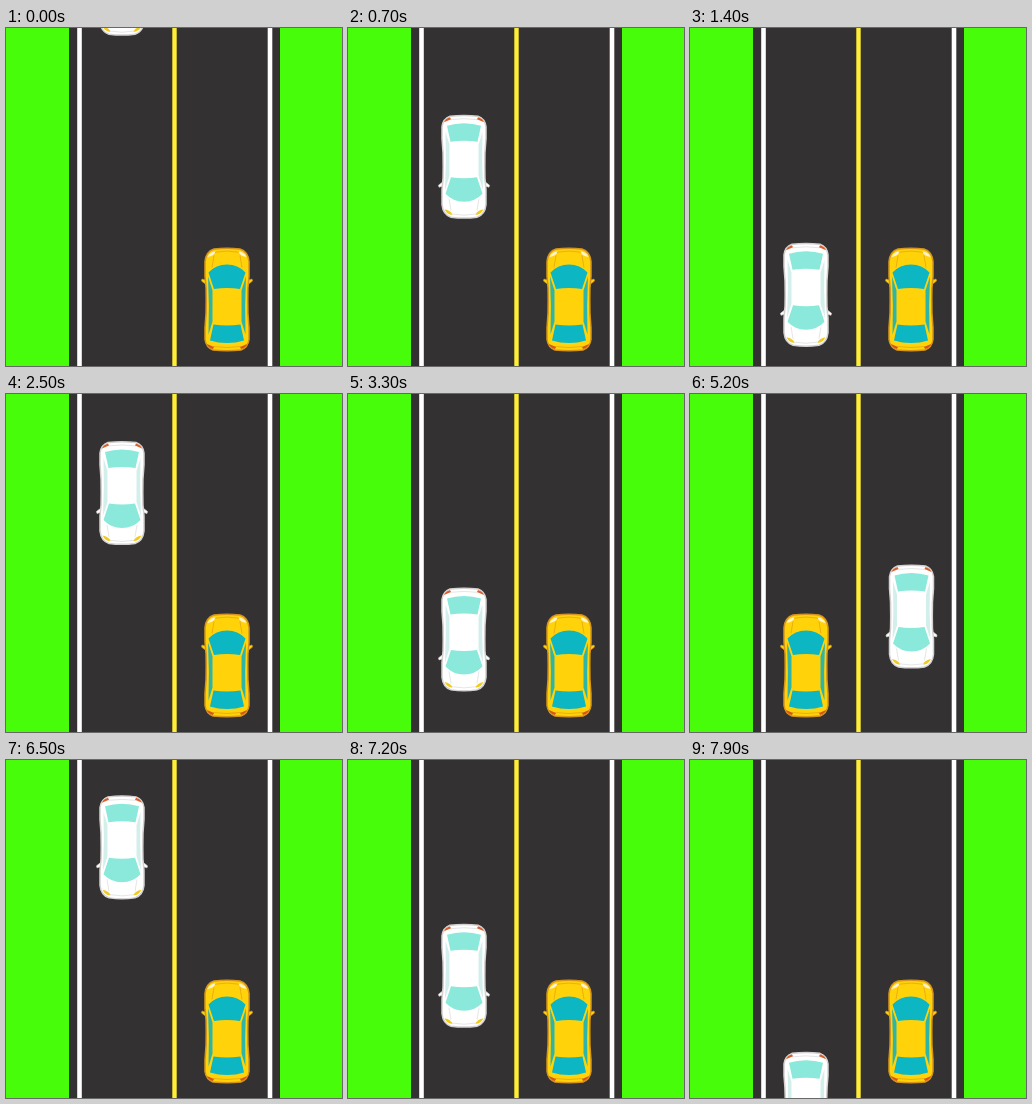
An HTML page that plays this animation: 336x338 px, repeating every 8000 ms.

```html
<!DOCTYPE html>
<html>
<head>
<meta charset="utf-8">
<style>
  html, body { margin: 0; height: 100%; overflow: hidden; }
  svg { display: block; width: 100vw; height: 100vh; }
  #player { --body: #ffd20a; --edge: #d5951c; --glass: #0cb6c2; --side: #2fb5a8; --lamp: #fff3d2; --brake: #d9541e; --crease: #e9b010; }
  #rival { --body: #fff; --edge: #d3d0cf; --glass: #8ae9da; --side: #d3efeb; --lamp: #f0cb1c; --brake: #d9602c; --crease: #e6e6e6; }
</style>
</head>
<body>
<svg viewBox="0 0 336 338" preserveAspectRatio="none">
  <defs>
    <!-- car seen from above, nose at y = 0, tail at y = 104 -->
    <g id="car">
      <path d="M-21 37L-25.5 33.5L-25 31.5L-20 33ZM21 37L25.5 33.5L25 31.5L20 33Z" fill="var(--body)" stroke="var(--edge)" stroke-width=".7"/>
      <path d="M-13 1.5Q0 -.2 13 1.5Q21 4 22 14V29Q20.5 40 20.8 52Q20.5 66 22 80V92Q21 100 14 102.5Q0 104 -14 102.5Q-21 100 -22 92V80Q-20.5 66 -20.8 52Q-20.5 40 -22 29V14Q-21 4 -13 1.5Z" fill="var(--body)" stroke="var(--edge)" stroke-width="1.5"/>
      <path d="M-15 5Q0 2 15 5M-13 8L-15 20M13 8L15 20M-14 99Q0 101 14 99" fill="none" stroke="var(--crease)"/>
      <path d="M-19 29L-14.5 43V74L-18.5 87Q-17.5 58 -19 29ZM19 29L14.5 43V74L18.5 87Q17.5 58 19 29Z" fill="var(--side)"/>
      <path d="M-18.5 25Q-11 17 0 17Q11 17 18.5 25L13 41.5Q0 39.5 -13 41.5Z" fill="var(--glass)"/>
      <path d="M-13.5 77Q0 79 13.5 77L17 93Q9 95.5 0 95.5Q-9 95.5 -17 93Z" fill="var(--glass)"/>
      <path d="M-19.5 9.5Q-17 4 -11.5 4Q-13 8.5 -19.5 9.5ZM19.5 9.5Q17 4 11.5 4Q13 8.5 19.5 9.5Z" fill="var(--lamp)"/>
      <path d="M-20 96.5L-13 99.5L-14 101.5Q-19 100 -20 96.5ZM20 96.5L13 99.5L14 101.5Q19 100 20 96.5Z" fill="var(--brake)"/>
    </g>
  </defs>
  <rect width="336" height="338" fill="#47fd0a"/>
  <rect x="63" width="211" height="338" fill="#333132"/>
  <path d="M73.5 0V338M264 0V338" stroke="#fff" stroke-width="4.6"/>
  <path d="M168.5 0V338" stroke="#ffee35" stroke-width="4.4"/>
  <use id="player" href="#car"/>
  <use id="rival" href="#car"/>
</svg>
<script>
  const LOOP = 8000, STEP = 100;
  const LEFT = 116, RIGHT = 221.5;
  const runs = [[-12, LEFT], [2005, LEFT], [4030, RIGHT], [6067, LEFT]];
  const player = document.getElementById('player');
  const rival = document.getElementById('rival');

  // quick entry from above, then steady driving
  const drive = ms => ms < 435 ? -100 + ms * 136 / 435 : 36 + (ms - 435) * .183;

  function draw(now) {
    const t = Math.floor(now % LOOP / STEP) * STEP;
    const [start, lane] = runs.filter(run => run[0] <= t).pop();
    const dodging = t >= 4400 && t < 6400;
    player.setAttribute('transform', `translate(${dodging ? 116 : 221} 219.5)`);
    rival.setAttribute('transform', `translate(${lane} ${drive(t - start) + 104}) scale(1 -1)`);
  }

  const begin = performance.now();
  function tick() {
    draw(performance.now() - begin);
    requestAnimationFrame(tick);
  }
  tick();
</script>
</body>
</html>
```
